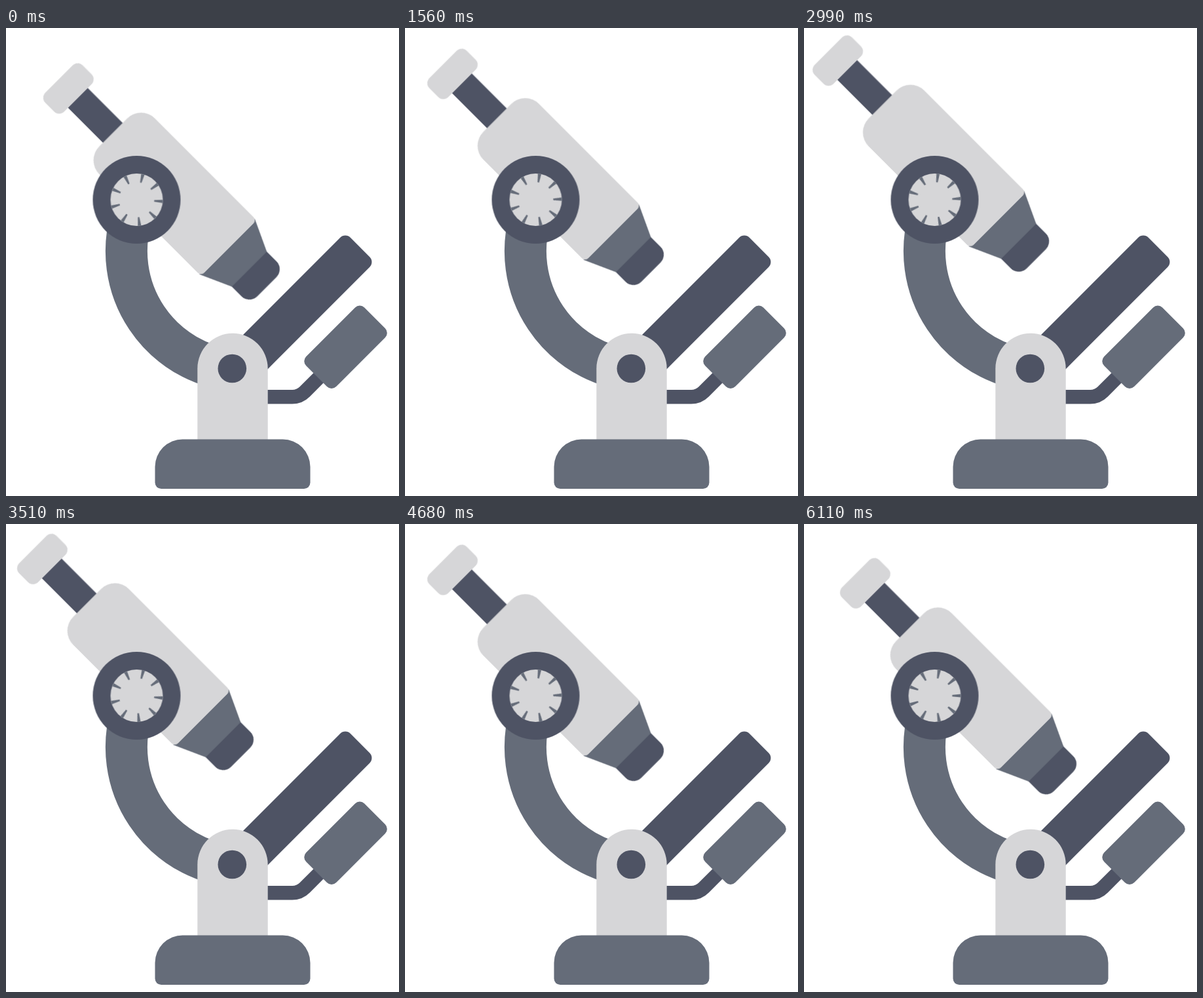
Write an HTML page that moves like this. It is 600 px wide and 714 px high and loops after 6240 ms.

```html
<!DOCTYPE html>
<html lang="en">
<head>
<meta charset="utf-8">
<title>Microscope</title>
<style>
  html, body { margin: 0; width: 100%; height: 100%; overflow: hidden; background: #fff; }
  svg { display: block; width: 600px; height: 714px; }
  .light { fill: #d6d6d8; }
  .mid { fill: #656c79; }
  .dark { fill: #4e5364; }
  .line { fill: none; }
  .tube, .dial { animation: 6240ms infinite; }
  .tube { animation-name: slide; }
  .dial { animation-name: turn; }

  /* 24 even steps up, 24 back down */
  @keyframes slide {
    0%, 100% { transform: translate(0, 0); animation-timing-function: steps(24, end); }
    50% { transform: translate(-45.6px, -44.4px); animation-timing-function: steps(24, end); }
  }
  @keyframes turn {
    0%, 100% { transform: rotate(3.7deg); animation-timing-function: steps(24, end); }
    50% { transform: rotate(-86.3deg); animation-timing-function: steps(24, end); }
  }
</style>
</head>
<body>
<svg viewBox="0 0 600 714">
  <!-- arm -->
  <path class="line" d="M191 290A183 183 0 0 0 346 522.3" stroke="#656c79" stroke-width="64"/>

  <!-- stage and mirror -->
  <path class="line" d="M395 562.8H437A27 27 0 0 0 456.1 554.9L482 529" stroke="#4e5364" stroke-width="21.5"/>
  <g transform="rotate(-45)">
    <rect class="dark" x="-100" y="586.9" width="245.7" height="63.6" rx="11"/>
    <rect class="mid" x="-40.4" y="678.4" width="125.8" height="64.9" rx="10"/>
  </g>

  <!-- post and base -->
  <path class="light" d="M292.3 632V519.5A53.7 53.7 0 0 1 399.7 519.5V632Z"/>
  <circle class="dark" cx="345.3" cy="519.5" r="21.8"/>
  <path class="mid" d="M227.5 669.5A42 42 0 0 1 269.5 627.5H422.5A42 42 0 0 1 464.5 669.5V693.5A9.5 9.5 0 0 1 455 703H237A9.5 9.5 0 0 1 227.5 693.5Z"/>

  <!-- tube -->
  <g class="tube">
    <g transform="rotate(45)">
      <rect class="dark" x="148" y="-23.5" width="85" height="42.6"/>
      <rect class="light" x="112.2" y="-42.5" width="40.9" height="80.7" rx="11"/>
      <path class="dark" d="M522 -40.3H543.7A17 17 0 0 1 560.7 -23.3V18.3A17 17 0 0 1 543.7 35.3H522Z"/>
      <path class="mid" d="M474.5 -62.8L522.8 -40.3V35.3L474.5 57Z"/>
      <path class="light" d="M258.4 -63.2H471A7 7 0 0 1 478 -56.2V50A7 7 0 0 1 471 57H258.4A30 30 0 0 1 228.4 27V-33.2A30 30 0 0 1 258.4 -63.2Z"/>
    </g>
  </g>

  <!-- focus knob -->
  <g transform="translate(199.5 262)">
    <circle class="dark" r="67"/>
    <circle class="light" r="40"/>
    <g class="dial mid" id="dial"></g>
  </g>
</svg>
<script>
  const ticks = 9;
  const dial = document.getElementById('dial');
  for (let i = 0; i < ticks; i++) {
    const tick = document.createElementNS('http://www.w3.org/2000/svg', 'path');
    tick.setAttribute('d', 'M26.8 -1.2L40 -2.6V2.6L26.8 1.2Z');
    tick.setAttribute('transform', `rotate(${i * 360 / ticks})`);
    dial.append(tick);
  }
</script>
</body>
</html>
```
